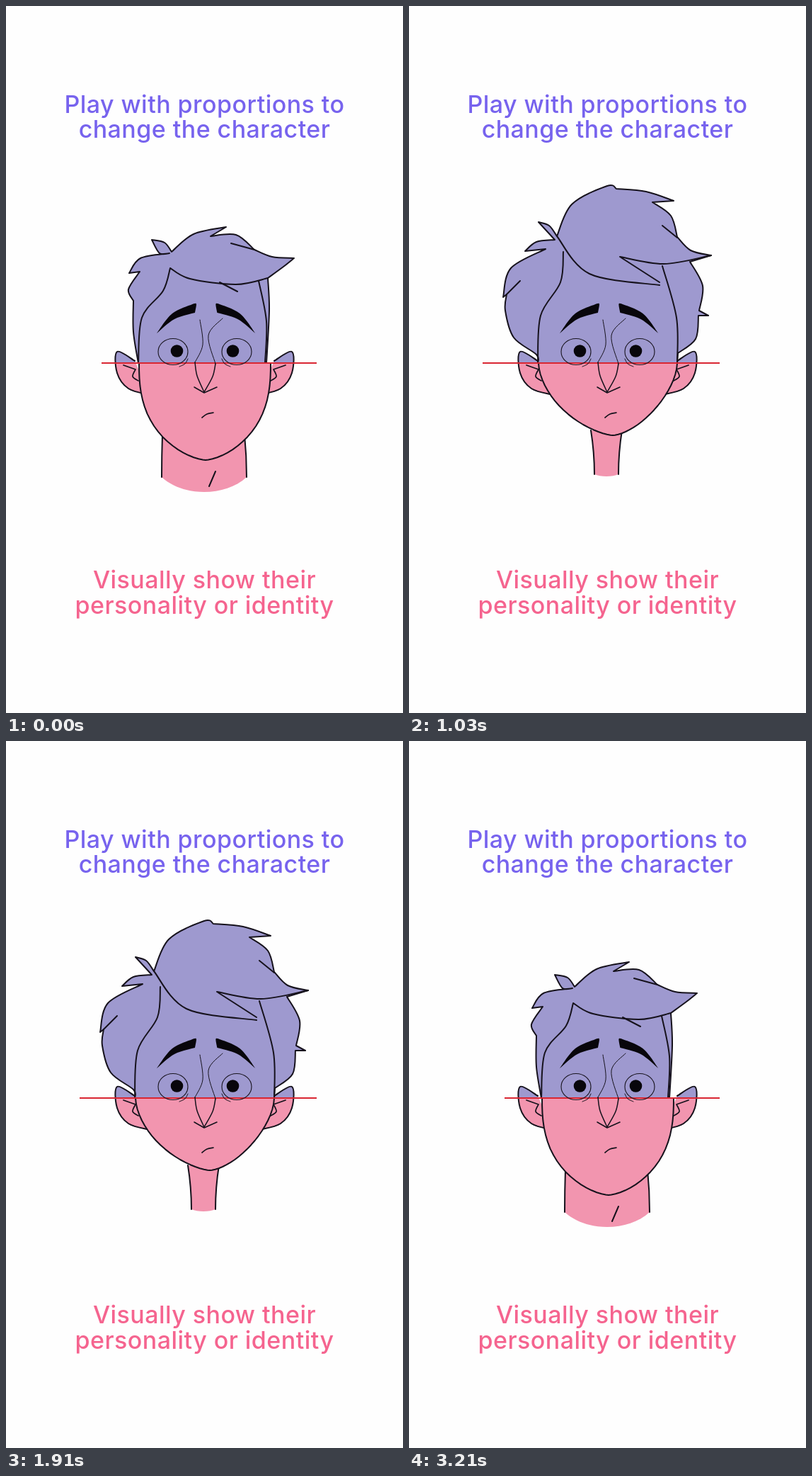
Write an HTML page that moves like this. It is 561 by 998 pixels and loops after 4 s.

```html
<!DOCTYPE html>
<html lang="en">
<head>
<meta charset="utf-8">
<title>Proportions</title>
<style>
html, body { margin: 0; width: 100%; height: 100%; overflow: hidden; background: #fefefe; }
svg { display: block; width: 100vw; height: 100vh; }
text { font: 450 34px Inter, "DejaVu Sans", sans-serif; letter-spacing: .45px; text-anchor: middle; }
.ink { fill: none; stroke: #16121c; stroke-linecap: round; stroke-linejoin: round; }
</style>
</head>
<body>
<svg id="stage" viewBox="0 0 561 998">
  <defs>
    <linearGradient id="skin" gradientUnits="userSpaceOnUse" x1="0" y1="503" x2="0" y2="505">
      <stop offset=".5" stop-color="#9e99cf"/>
      <stop offset=".5" stop-color="#f295af"/>
    </linearGradient>
  </defs>
  <g fill="#7763ee">
    <text x="280.5" y="150.5">Play with proportions to</text>
    <text x="280.5" y="186">change the character</text>
  </g>
  <g fill="#f5648f">
    <text x="280.5" y="822">Visually show their</text>
    <text x="280.5" y="857.5">personality or identity</text>
  </g>
</svg>
<script>
const EYE_LINE = 504, MIDDLE = 281, BLACK = '#08060b';
const stage = document.getElementById('stage');

function add(parent, tag, attrs = {}) {
  const el = document.createElementNS('http://www.w3.org/2000/svg', tag);
  for (const k in attrs) el.setAttribute(k, attrs[k]);
  return parent.appendChild(el);
}

// Smooth curve through key points; "/" marks a corner.
function curve(text) {
  let last = null, d = '';
  for (const part of text.split('/')) {
    const run = part.trim().split(/\s+/).map(p => p.split(',').map(Number));
    if (last) run.unshift(last);
    else d = 'M' + run[0];
    for (let i = 0; i < run.length - 1; i++) {
      const a = run[i], b = run[i + 1];
      const before = run[i - 1] || a, after = run[i + 2] || b;
      const c1 = a.map((v, k) => v + (b[k] - before[k]) / 6);
      const c2 = b.map((v, k) => v - (after[k] - a[k]) / 6);
      d += `C${c1} ${c2} ${b}`;
    }
    last = run[run.length - 1];
  }
  return d;
}

const fill = (g, d, color = 'url(#skin)') => add(g, 'path', { d, fill: color });
const ink = (g, d, w = 2) => add(g, 'path', { d, class: 'ink', 'stroke-width': w });
const shape = (g, d) => { fill(g, d); ink(g, d); };

// Draws the same part on both sides of a vertical axis.
function mirrored(parent, axis, draw) {
  draw(add(parent, 'g'));
  draw(add(parent, 'g', { transform: `translate(${2 * axis}) scale(-1 1)` }));
}

// Each side narrows like a superellipse; "square" sets how heavy the jaw is.
function jaw({ width, chin, lean, square }) {
  const side = (s, u) => {
    const x = MIDDLE + lean * u ** 4 + s * width * (1 - u ** square) ** .65;
    return `${x.toFixed(1)},${(EYE_LINE + (chin - EYE_LINE) * u).toFixed(1)}`;
  };
  const points = [];
  for (let a = -20; a <= 20; a++) {
    points.push(side(Math.sign(a), Math.cos(a / 20 * Math.PI / 2 + Math.PI / 2 * (a < 0 ? 1 : -1))));
  }
  const us = Array.from({ length: 21 }, (_, i) => Math.sin(i / 20 * Math.PI / 2));
  const left = us.map(u => side(-1, u)), right = us.map(u => side(1, u)).reverse();
  return 'M' + left.concat(right).join('L');
}

function neck(g, { top, bottom, from, to, sag }) {
  const mid = (from + to) / 2;
  const edge = i => `${top[i]} ${from}Q${bottom[i]} ${mid} ${bottom[i]} ${to}`;
  const [l, r] = bottom, inset = (r - l) / 4;
  fill(g, `M${edge(0)}C${l + inset} ${to + sag} ${r - inset} ${to + sag} ${r} ${to}Q${r} ${mid} ${top[1]} ${from}Z`);
  ink(g, `M${edge(0)}M${edge(1)}`);
}

function ear(g) {
  shape(g, curve('182,501 157,488 157,518 173,540 203,549'));
  ink(g, curve('166,507 183,513 / 179,523 187,529'), 1.7);
}

function eye(g) {
  add(g, 'ellipse', { cx: 236, cy: 488, rx: 21, ry: 18.5, class: 'ink', 'stroke-width': 1.1 });
  add(g, 'circle', { cx: 241.5, cy: 487, r: 8.8, fill: BLACK });
  ink(g, curve('245,509 253,505 257,498'), 1);
}

function head(parent, p) {
  const g = add(parent, 'g');
  neck(g, p.neck);
  mirrored(g, MIDDLE - .5, ear);
  shape(g, curve(p.hair));
  shape(g, jaw(p.jaw));
  p.strands.forEach(s => ink(g, curve(s)));
  add(g, 'path', { d: `M${p.line[0]} ${EYE_LINE}H${p.line[1]}`, stroke: '#d92632', 'stroke-width': 2.2 });
  return g;
}

const average = {
  line: [135, 439],
  jaw: { width: 93, chin: 641, lean: 1, square: 2.6 },
  neck: { top: [221, 337], bottom: [220, 340], from: 605, to: 665, sag: 28 },
  hair: '187,504 180,460 180,416 / 173,400 189,375 / 174,377 / 190,356 231,349 / 217,349 206,330 / 224,334 234,347 / 265,322 311,312 / 289,325 / 325,323 351,344 / 376,354 407,356 / 392,368 370,384 / 372,430 368,504',
  strands: [
    '370,384 325,393 260,385 232,370 / 222,402 192,440 187,504',
    '357,388 368,445 366,504', '302,390 327,403', '318,335 351,344', '296,657 287,678'
  ]
};

const slight = {
  line: [104, 439],
  jaw: { width: 98, chin: 606, lean: 7, square: 1.7 },
  neck: { top: [257, 301], bottom: [262, 296], from: 599, to: 661, sag: 4 },
  hair: '182,504 180,492 148,468 136,430 138,407 / 133,411 / 144,370 193,343 / 164,346 / 180,333 206,330 / 183,305 / 198,310 209,325 / 230,280 280,254 293,258 / 335,262 374,275 / 344,277 / 370,296 379,326 / 398,345 427,352 / 397,361 / 415,395 410,430 / 423,437 / 409,437 / 405,470 380,490 / 379,504',
  strands: [
    '138,407 157,388', '358,310 379,327', '427,352 360,364 298,354 / 354,390',
    '209,325 255,378 354,394', '218,347 214,390 186,437 182,504', '358,367 378,440 379,504'
  ]
};

const heavy = {
  line: [135, 442],
  jaw: { width: 89, chin: 676, lean: -10, square: 4 },
  neck: { top: [188, 371], bottom: [186, 382], from: 545, to: 713, sag: 46 },
  hair: '190,504 193,435 214,397 228,384 / 208,381 / 227,380 / 222,370 / 229,380 / 237,366 / 231,383 / 290,364 346,367 / 333,369 / 365,379 395,381 / 375,394 350,396 / 363,435 368,504',
  strands: [
    '375,394 340,396 304,392 / 341,420', '233,387 280,413 341,420',
    '228,388 212,436 190,485 190,504', '341,398 366,465 368,504', '307,700 283,723'
  ]
};

const heads = [average, slight, heavy].map(p => head(stage, p));

const face = add(stage, 'g');
mirrored(face, MIDDLE, eye);
mirrored(face, 282.7, g => fill(g, curve('213,462 235,434 266,420 / 269,421 267,433 / 238,442 213,462'), BLACK));
ink(face, curve('274,443 278,478 267,503'), 1);
ink(face, curve('306,441 286,465 296,505'), 1);
ink(face, curve('267,503 270,522 280,545 / 292,523 296,505'), 1.5);
ink(face, curve('266,538 280,546 / 298,538'), 1.6);
ink(face, curve('277,581 284,576 293,574'), 1.7);

function show(time) {
  const index = time < 1030 || time >= 2970 ? 0 : time < 2000 ? 1 : 2;
  heads.forEach((g, i) => g.setAttribute('display', i === index ? 'inline' : 'none'));
}

const start = performance.now();
function tick() {
  show((performance.now() - start) % 4000);
  requestAnimationFrame(tick);
}
tick();
</script>
</body>
</html>
```
